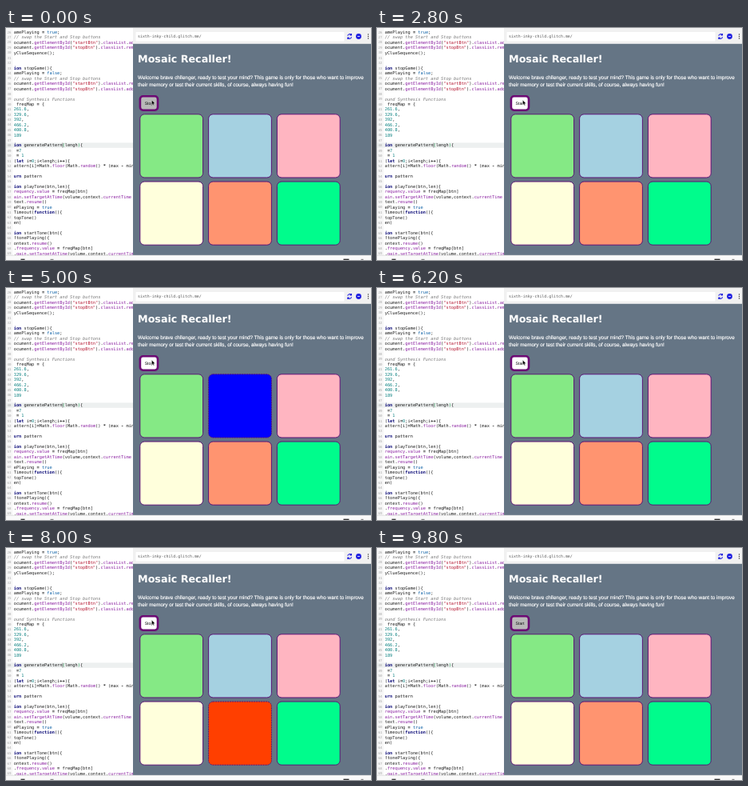
An HTML page that plays this animation: 457x290 px, repeating every 10 s.

```html
<!DOCTYPE html>
<html lang="en">
<head>
<meta charset="utf-8">
<title>Mosaic Recaller</title>
<style>
html, body { margin: 0; width: 100%; height: 100%; overflow: hidden; background: #fff; }
svg { display: block; width: 457px; height: 290px; }
text { white-space: pre; text-rendering: geometricPrecision; }
.code { font: 5.32px "DejaVu Sans Mono", monospace; fill: #1c1c1c; }
.note { font-style: italic; fill: #777; }
.string { fill: #b3122e; }
.number { fill: #0b8080; }
.keyword { fill: #0c0c78; font-weight: bold; }
.bool { fill: #0a5fa5; }
.prop { fill: #8a1fa0; }
.op { font-weight: bold; }
.match { fill: #0a9a40; }
.num { font: 4.2px "DejaVu Sans Mono", monospace; fill: #aaa; text-anchor: end; }
.url { font: 4.92px "DejaVu Sans Mono", monospace; fill: #555; }
.title { font: bold 12.7px "DejaVu Sans", sans-serif; fill: #fff; }
.body { font: 6.41px "Liberation Sans", Arial, sans-serif; fill: #fff; stroke: #fff; stroke-width: 0.16px; }
.label { font: 5.2px "Liberation Sans", Arial, sans-serif; fill: #111; text-anchor: middle; }
</style>
</head>
<body>
<svg id="stage" viewBox="0 0 457 290"></svg>
<script>
const LOOP = 10000;
const STEP = 200;
const stage = document.getElementById("stage");

const CODE = `amePlaying = true;
// swap the Start and Stop buttons
ocument.getElementById("startBtn").classList.add
ocument.getElementById("stopBtn").classList.remove
yClueSequence();


ion stopGame(){
amePlaying = false;
// swap the Start and Stop buttons
ocument.getElementById("startBtn").classList.remove
ocument.getElementById("stopBtn").classList.add

ound Synthesis Functions
 freqMap = {
261.6,
329.6,
392,
466.2,
400.8,
189

ion generatePattern(lengh){
 =7
 = 1
(let i=0;i<lengh;i++){
attern[i]=Math.floor(Math.random() * (max - min

urn pattern

ion playTone(btn,len){
requency.value = freqMap[btn]
ain.setTargetAtTime(volume,context.currentTime
text.resume()
ePlaying = true
Timeout(function(){
topTone()
en)

ion startTone(btn){
!tonePlaying){
ontext.resume()
.frequency.value = freqMap[btn]
.gain.setTargetAtTime(volume,context.currentTime`.split("\n");
const ACTIVE_LINE = 22;

const TOKEN = new RegExp([
  /(?<note>^(?:\/\/|ound).*)/,
  /(?<string>"[^"]*")/,
  /(?<number>\b\d+(?:\.\d+)?)/,
  /(?<keyword>\b(?:function|let|ion|urn)\b)/,
  /(?<bool>\b(?:true|false)\b)/,
  /(?<prop>(?<=\.)[a-z]\w*|^(?:requency|ain))/,
  /(?<match>(?<=Pattern)\(|(?<=\(lengh)\))/,
  /(?<op>[=<*+!-]+)/
].map(r => r.source).join("|"), "g");

const TILES = ["#85e985", "#a5d1e1", "#ffb5c1", "#ffffdc", "#ff9470", "#00fc8c"];

// Each round: Stop appears, one tile lights up, Start returns
const ROUNDS = [
  { start: 0, on: 1000, off: 2000, end: 2400, tile: 5, color: "#287f4b" },
  { start: 3400, on: 4400, off: 5400, end: 6000, tile: 1, color: "#0000ff" },
  { start: 6800, on: 7800, off: 8800, end: 9200, tile: 4, color: "#ff3f00" }
];
const HOVER_FROM = 400;
const HOVER_TO = 9400;

function add(tag, attrs, text, parent = stage) {
  const el = document.createElementNS("http://www.w3.org/2000/svg", tag);
  for (const key in attrs) el.setAttribute(key, attrs[key]);
  if (text !== undefined) el.textContent = text;
  parent.appendChild(el);
  return el;
}

const rect = (x, y, width, height, fill, more) =>
  add("rect", { x, y, width, height, fill, ...more });
const text = (cls, x, y, value) => add("text", { class: cls, x, y }, value);
const path = (d, more) => add("path", { d, fill: "none", ...more });

function codeLine(x, y, line) {
  const el = text("code", x, y, "");
  let pos = 0;
  for (const m of line.matchAll(TOKEN)) {
    const kind = Object.keys(m.groups).find(key => m.groups[key]);
    el.append(line.slice(pos, m.index));
    add("tspan", { class: kind }, m[0], el);
    pos = m.index + m[0].length;
  }
  el.append(line.slice(pos));
}

function drawEditor() {
  const lineY = i => 4.9 + i * 6.44;
  rect(0, 0, 159, 284, "#fff");
  rect(0, 0, 8.5, 284, "#f7f7f7");
  rect(0, lineY(ACTIVE_LINE) - 3.2, 159, 6.44, "#edf0f0");
  CODE.forEach((line, i) => {
    text("num", 6.5, lineY(i) + 1.6, 26 + i);
    codeLine(9.7, lineY(i) + 1.9, line);
  });
  rect(70.7, lineY(ACTIVE_LINE) - 3, 0.5, 6, "#222");
}

function drawBrowser() {
  rect(159, 0, 298, 290, "#f1f1f1");
  rect(162.5, 5, 261, 11.4, "#fff", { rx: 0.8 });
  text("url", 165, 12.2, "sixth-inky-child.glitch.me/");
  const blue = { stroke: "#2020e0", "stroke-width": 1.1 };
  path("M427.8 9.8a2.5 2.5 0 0 1 4.5-1.2M432.5 6.9v2h-2M432.5 11.2a2.5 2.5 0 0 1-4.5 1.2M427.8 14v-2h2", blue);
  add("circle", { cx: 441.5, cy: 10.5, r: 3.4, fill: "#2020e0" });
  path("M440 10.5h3", { stroke: "#fff", "stroke-width": 0.8 });
  [8, 10.5, 13].forEach(cy => add("circle", { cx: 453.5, cy, r: 0.7, fill: "#333" }));
}

function drawPage() {
  rect(159, 19.8, 298, 264.2, "#657585");
  text("title", 165, 43.3, "Mosaic Recaller!");
  text("body", 165, 64, "Welcome brave chllenger, ready to test your mind? This game is only for those who want to improve");
  text("body", 165, 73.4, "their memory or test their current skills, of course, always having fun!");
}

function drawFooter() {
  rect(0, 284, 457, 6, "#fafafa");
  rect(0, 283.8, 457, 0.6, "#ccc");
  rect(18.5, 288.6, 5, 1.4, "#444");
  rect(55.5, 288.8, 4, 1.2, "#888");
  rect(422.5, 288.6, 7, 1.4, "#333");
  rect(444.5, 288.8, 3, 1.2, "#888");
}

drawEditor();
drawBrowser();
drawPage();
drawFooter();

const tiles = TILES.map((fill, i) =>
  rect(167.8 + (i % 3) * 85.8, 107.8 + Math.floor(i / 3) * 84.2, 78.8, 79.2, fill,
    { rx: 5.6, stroke: "#5a1276" }));
const button = rect(167.9, 85.3, 22.1, 17.4, "#fff",
  { rx: 3.6, stroke: "#6c0a74", "stroke-width": 2.6 });
const label = text("label", 179, 96.1, "Stop");
const pointer = path("M182.4 90v6l1.4-1.2.9 2.1 1-.4-.9-2.1h1.9z",
  { fill: "#000", stroke: "#fff", "stroke-width": 0.4 });

function render(ms) {
  const t = Math.floor((ms % LOOP) / STEP) * STEP;
  const round = ROUNDS.find(r => t >= r.start && t < r.end);
  const lit = round && t >= round.on && t < round.off ? round : null;
  const hover = t >= HOVER_FROM && t < HOVER_TO;

  tiles.forEach((tile, i) => {
    const isLit = lit && lit.tile === i;
    tile.setAttribute("fill", isLit ? lit.color : TILES[i]);
    tile.setAttribute("stroke-dasharray", isLit ? "2 1" : "none");
  });
  label.textContent = round ? "Stop" : "Start";
  button.setAttribute("fill", hover ? "#fff" : "#b9b9b9");
  pointer.setAttribute("visibility", t < HOVER_TO ? "visible" : "hidden");
}

const began = performance.now();
function tick() {
  render(performance.now() - began);
  requestAnimationFrame(tick);
}
tick();
</script>
</body>
</html>
```
